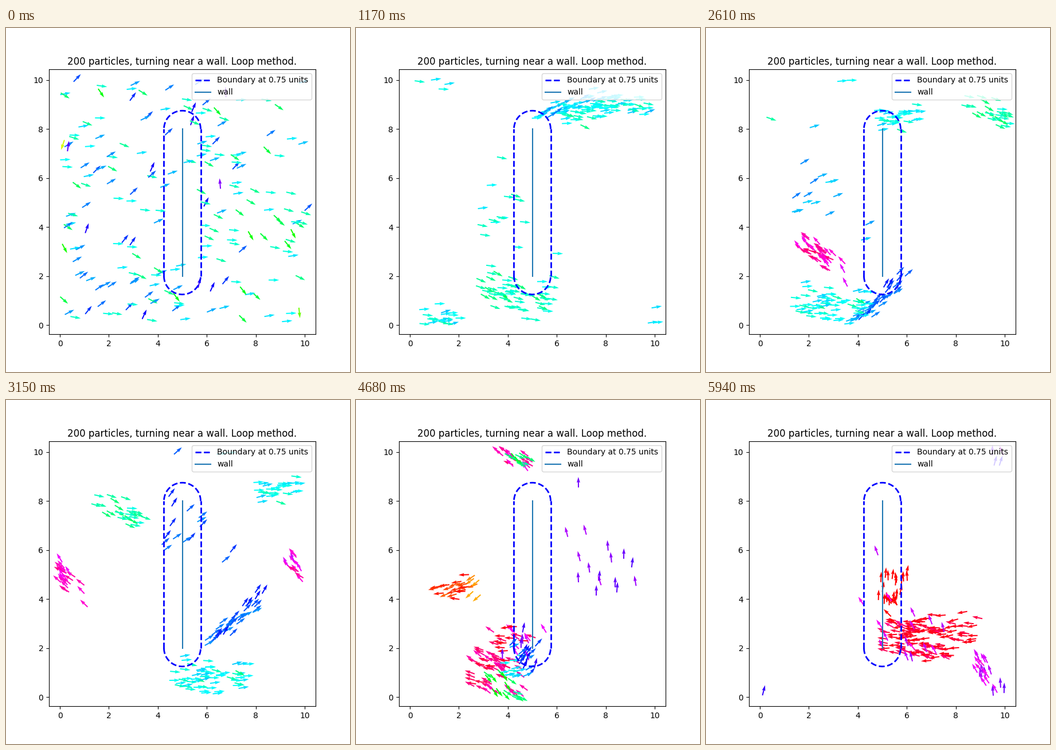
These frames come from a looping animation (600x600 px, 5.97 s). A matplotlib script:

```python
import numpy as np
import matplotlib.pyplot as plt
from matplotlib.animation import FuncAnimation

BOX, SPEED = 10, 0.18
FRAMES, INTERVAL = 199, 30
GATHER = 25  # steps until the loose start has drawn together
rng = np.random.default_rng(4)
steps = np.arange(-20, FRAMES + 21)


class Flock:
    """Particles strung out along one path flown at constant speed.

    via is (step, x, y), a point on the path; turns maps steps to headings
    in degrees. Headings past a half turn stay red.
    """

    def __init__(self, n, lag, width, via, turns):
        head = np.interp(steps, list(turns), list(turns.values()))
        path = np.cumsum(SPEED * np.exp(1j * np.radians(head)))
        t, x, y = via
        self.head = head
        self.path = path - path[t - steps[0]] + x + 1j * y
        self.lag = rng.uniform(-lag, lag, n)
        self.side = width * (rng.normal(size=n) + 1j * rng.normal(size=n))
        self.loose = rng.uniform(-4, 4, n) + 1j * rng.uniform(-4, 4, n)
        self.jitter = rng.normal(0, 9, n)

    def at(self, t):
        when = t + self.lag
        far = max(0, 1 - t / GATHER) ** 2
        pos = np.interp(when, steps, self.path) + self.side + far * self.loose
        head = np.interp(when, steps, self.head) + self.jitter * (1 + 2 * far)
        return pos, head


flocks = [
    # over the top of the wall, then round to the upper left
    Flock(38, 6, .25, (19, 4.6, 9.3),
          {0: 15, 13: 60, 19: 20, 23: -22, 30: 0, 59: 0, 87: 145,
           123: 125, 156: 150, 170: 172}),
    # up along the wall
    Flock(36, 8, .18, (19, 3.8, 7.1),
          {0: 10, 8: 70, 11: 120, 19: 102, 24: 60, 28: 20, 59: 5, 75: 10,
           87: 45, 110: 40, 120: 115, 156: 148, 170: 170}),
    # the long stream along the bottom
    Flock(58, 8, .35, (19, .8, 2.6),
          {0: -10, 19: -35, 27: -22, 45: -12, 59: 2, 87: -2, 123: 2,
           150: 5, 156: 70, 160: 174, 198: 180}),
    # down along the left side of the wall
    Flock(26, 6, .25, (123, 3.5, 5.6),
          {0: 0, 19: 12, 59: -8, 87: -20, 112: -20, 123: -138, 156: -40,
           185: 0, 198: 115}),
    # down, then left through the edge and up inside the boundary
    Flock(26, 4, .25, (156, 2.1, 4.5),
          {0: 0, 19: 30, 28: -10, 59: 0, 123: 0, 156: -170, 190: -166,
           197: -275}),
    # strays
    Flock(16, 8, .9, (156, 7.5, 5.3),
          {0: -30, 59: 5, 87: 20, 123: 70, 156: 95, 198: 115}),
]


def particles(t):
    """Tails, unit velocities and colour angles at step t."""
    parts = [f.at(t) for f in flocks]
    pos, head = (np.concatenate(p) for p in zip(*parts))
    xy = np.column_stack([pos.real % BOX, pos.imag % BOX])
    a = np.radians(head)
    return xy, np.cos(a), np.sin(a), a


fig, ax = plt.subplots(figsize=(6, 6), dpi=100)
xy, u, v, c = particles(0)
arrows = ax.quiver(xy[:, 0], xy[:, 1], u, v, c, cmap='hsv', clim=(-np.pi, np.pi))

R = 0.75
cap = np.linspace(0, np.pi, 60)
ax.plot([5 - R, 5 - R], [2, 8], 'b--', lw=2, label='Boundary at 0.75 units')
ax.plot([5 + R, 5 + R], [2, 8], 'b--', lw=2)
ax.plot(5 + R * np.cos(cap), 8 + R * np.sin(cap), 'b--', lw=2)
ax.plot(5 - R * np.cos(cap), 2 - R * np.sin(cap), 'b--', lw=2)
ax.plot([5, 5], [2, 8], 'C0', label='wall')

ax.set_xlim(-0.448, 10.448)
ax.set_ylim(-0.37, 10.44)
ax.set_title('200 particles, turning near a wall. Loop method.')
ax.legend(loc='upper right')


def update(t):
    xy, u, v, c = particles(t)
    arrows.set_offsets(xy)
    arrows.set_UVC(u, v, c)
    return arrows,


anim = FuncAnimation(fig, update, frames=FRAMES, interval=INTERVAL,
                     repeat=True, repeat_delay=0)
plt.show()
```
